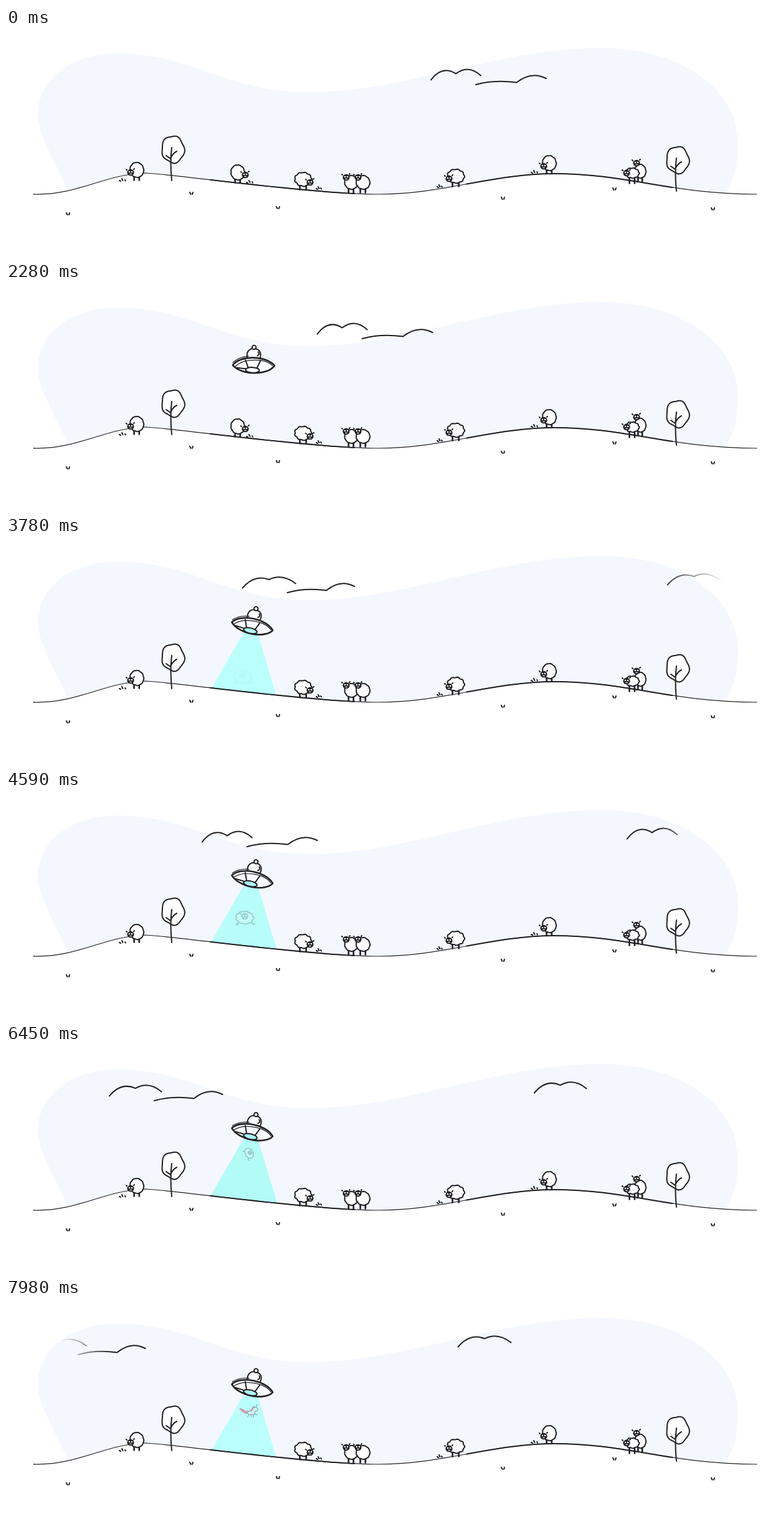
These frames come from a looping animation (1239 px wide and 363 px high, 8000 ms). An HTML page:

```html
<!DOCTYPE html>
<html lang="en">
<head>
<meta charset="utf-8">
<title>Meadow visit</title>
<style>
html, body { margin: 0; width: 100%; height: 100%; overflow: hidden; background: #fff; }
svg { display: block; width: 1239px; height: 363px; }
.ink { fill: none; stroke: #1f1f22; stroke-width: 2; stroke-linecap: round; stroke-linejoin: round; }
.thin { stroke-width: 1.2; }
.bold { stroke-width: 2.6; }
.white { fill: #fff; }
.dark { fill: #1f1f22; }
</style>
</head>
<body>
<svg viewBox="0 0 1239 363">
  <defs>
    <linearGradient id="edge" gradientUnits="userSpaceOnUse" x1="0" x2="1239" y1="0" y2="0">
      <stop offset=".071" stop-color="#000"/>
      <stop offset=".137" stop-color="#fff"/>
      <stop offset=".843" stop-color="#fff"/>
      <stop offset=".931" stop-color="#000"/>
    </linearGradient>
    <mask id="fade" maskUnits="userSpaceOnUse" x="0" y="0" width="1239" height="363">
      <rect width="1239" height="363" fill="url(#edge)"/>
    </mask>
  </defs>
  <path fill="#f4f7fe" d="M97 255C85 226 51 172 51 140C51 85 100 41 180 41C300 41 350 103 490 103C640 103 790 32 955 32C1085 32 1175 100 1175 185C1175 220 1168 245 1154 264V270H97Z"/>
  <g id="birds" mask="url(#fade)"></g>
  <path id="beam"/>
  <g id="land"></g>
  <g id="rising"></g>
  <g id="pony" class="ink" style="stroke:#7c9c9e;stroke-width:1.1">
    <path d="M-1 -1C-5 4 -7 -6 -14 -4C-11 -2 -10 2 -6 2C-3 5 0 3 2 0" style="stroke:#c98295;fill:#d993a5"/>
    <path d="M0 0C4 -2 6 -1 8 -5C10 -9 15 -6 15 -2L11 0C12 6 5 6 1 5C-2 4 -2 1 0 0Z" fill="#d9f3f1"/>
    <path d="M1 5L-1 9M4 5L5 10M8 5L8 10M10 4L14 6M12 -6L14 -11"/>
    <path d="M9 -7C5 -6 8 -3 4 -1" style="stroke:#c98295;stroke-width:2.4"/>
  </g>
  <g id="ship" class="ink">
    <path d="M-10 -10C-13 -20 -8 -26 0 -26C9 -26 13 -20 10 -10Z" fill="#fbfcff"/>
    <circle cy="-28" r="3.200" fill="#fbfcff"/>
    <path d="M7 -21Q10 -17 6 -15"/>
    <path class="bold" d="M-33 2C-22 -15 20 -16 34 0C24 16 -18 18 -33 2Z" fill="#fbfcff"/>
    <path class="thin" d="M-33 -2Q-23 -12 -8 -13.500"/>
    <path class="thin" d="M-29 4C-16 -10 18 -12 31 0"/>
    <path d="M-13 -7L-8 5M11 -7L6 5M-26 6L-11 7"/>
    <ellipse id="hatch" cx="-1" cy="8.500" rx="11" ry="4.300"/>
  </g>
</svg>
<script>
const NS = 'http://www.w3.org/2000/svg';
const $ = id => document.getElementById(id);
const LOOP = 8000, STEP = 30, TAU = Math.PI * 2;

function add(parent, tag, attrs) {
  const el = document.createElementNS(NS, tag);
  for (const k in attrs) el.setAttribute(k, attrs[k]);
  return parent.appendChild(el);
}
const ink = (parent, d, kind = '') => add(parent, 'path', { class: 'ink ' + kind, d });
const mix = (a, b, u) => a + (b - a) * u;
function ease(t, from, to) {
  const u = Math.max(0, Math.min(1, (t - from) / (to - from)));
  return u * u * (3 - 2 * u);
}

// Rounded outline with a number of lobes
function puff(parent, x, y, rx, ry, lobes, bump) {
  let d = '';
  for (let i = 0; i < 72; i++) {
    const a = i / 72 * TAU, r = 1 + bump * Math.sin(a * lobes + 1) + 0.02 * Math.sin(a * 2);
    d += `${i ? 'L' : 'M'}${x + rx * r * Math.cos(a)} ${y + ry * r * Math.sin(a)}`;
  }
  ink(parent, d + 'Z', 'white');
}

function head(parent, x, y) {
  add(parent, 'ellipse', { class: 'dark', cx: x, cy: y, rx: 5.6, ry: 5.2 });
  for (const s of [-1, 1]) add(parent, 'circle', { class: 'white', cx: x + s * 2, cy: y - 1, r: 1.3 });
  add(parent, 'ellipse', { class: 'white', cx: x, cy: y + 2.5, rx: 2, ry: 0.8 });
  ink(parent, `M${x - 6} ${y - 4}l-1 -1M${x + 5} ${y - 5}l1 -1`);
}

// Head is placed relative to the body; wide sheep are woolly
function sheep(parent, x, y, dx, dy, rx = 11, ry = 12) {
  for (const s of [-0.4, 0.35]) ink(parent, `M${x + s * rx} ${y + ry - 2}V${y + 16.5}`, 'bold');
  puff(parent, x, y, rx, ry, 9, rx > 11 ? 0.05 : 0.02);
  head(parent, x + dx, y + dy);
}

const grass = (parent, x, y, w = 5) =>
  ink(parent, `M${x - w} ${y}l2 1M${x - 1} ${y - 3}l1.500 3M${x + w - 1} ${y - 1}l1 1.500`);

function tree(parent, x, y) {
  puff(parent, x, y, 18, 21.5, 5, 0.05);
  ink(parent, `M${x - 2} ${y - 3}q-3 23 0 53m-2 -36q4 -8 10 -11m-17 7l7 5`);
}

const land = $('land');
const hill = 'M45 267C115 269 160 234 225 233C290 237 490 267 600 267' +
  'C700 267 780 234 880 234C1000 234 1060 266 1205 267';
add(land, 'path', { class: 'white', d: hill + 'V363H45Z' });
ink(land, hill, 'thin');
const heavy = ink(land, hill);
heavy.setAttribute('pathLength', 1160);
heavy.setAttribute('stroke-dasharray', '0 285 230 180 330 999');

tree(land, 268, 195);
tree(land, 1078, 212);

const grazer = add(land, 'g', {});
sheep(land, 210, 228, -10, 4);
sheep(grazer, 372, 232, 12, 4);
sheep(land, 477, 243, 11, 5, 13.5, 11);
sheep(land, 554, 248, -8, -8, 10.5, 11);
sheep(land, 573, 248, -8, -8, 11, 11);
sheep(land, 722, 238, -11, 4, 13.5, 11);
sheep(land, 872, 217, -9, 5);
sheep(land, 1018, 230, -6, -13, 9, 11);
sheep(land, 1005, 233, -9, 0, 11.1, 8);
grass(land, 187, 245);
grass(grazer, 391, 248);
grass(land, 502, 258, 4);
grass(land, 696, 255, 4);
grass(land, 848, 232);

for (const [x, y] of [[100, 298], [298, 265], [437, 288], [798, 273], [977, 258], [1135, 290]])
  ink(land, `M${x - 3} ${y - 1}l1.500 3M${x + 2} ${y - 1}l-1 3`);

const rising = $('rising');
ink(rising, 'M-9 7L-14 11M-14 11L-11 11M9 7L14 11L16 9');
puff(rising, 0, 0, 14, 10, 9, 0.05);
head(rising, 0, -2);

// Wing heights run from tip to tip; sway is how much the span changes per flap
const gull = { span: 83, sway: 3, notch: 0.5, ys: [83.5, 69, 71.5, 66.5, 76.5], dip: -2 };
const glider = { span: 110, sway: -3, notch: 0.58, ys: [91, 86, 87.5, 76.5, 81], dip: 0 };
const birds = [
  { ...gull, x: 682, lift: 0 },
  { ...glider, x: 754, lift: 0 },
  { ...gull, x: 1364, lift: 5 }
];
for (const b of birds) b.el = ink($('birds'), '');

function drawBird(b, t) {
  const flap = Math.cos((t - 1110) / 2400 * TAU);
  const x = b.x - 0.08 * t, w = b.span + b.sway * flap, n = w * b.notch;
  const [tip, crest, mid, crest2, end] = b.ys.map(y => y - b.lift);
  const ny = mid + b.dip * flap;
  b.el.setAttribute('d', `M${x} ${tip}Q${x + n * 0.45} ${2 * crest - (tip + ny) / 2} ${x + n} ${ny}` +
    `Q${x + (n + w) / 2} ${2 * crest2 - (ny + end) / 2} ${x + w} ${end}`);
}

function place(el, x, y, scale, turn, alpha) {
  el.setAttribute('transform', `translate(${x} ${y}) rotate(${turn}) scale(${scale})`);
  el.setAttribute('opacity', alpha);
}

function draw(t) {
  birds.forEach(b => drawBird(b, t));

  // Ship glides in, sways, then settles tilted over the grazer
  const settle = ease(t, 2450, 3000);
  const sway = Math.cos((t - 1350) / 1860 * TAU), hover = Math.cos((t - 3780) / 1050 * TAU);
  const x = -40 + 437 / (1 + Math.exp((853 - t) / 152)) - 2 * settle;
  const y = mix(138.5 + 5.5 * sway, 142.3 + 1.7 * hover, settle);
  const tilt = mix(-2.5 * sway, 13, settle);
  place($('ship'), x, y, 1, tilt, 1);

  const on = ease(t, 2650, 3050), r = tilt * TAU / 360;
  const hx = x - Math.cos(r) - 8.5 * Math.sin(r), hy = y + 8.5 * Math.cos(r);
  const beam = $('beam'), glow = (1 + hover) / 2;
  beam.setAttribute('d', `M${hx - 9} ${hy}H${hx + 11}L${435 - hover} 258L${321 + hover} 258Z`);
  beam.setAttribute('fill', `rgb(${mix(179, 186, glow)} ${mix(251, 255, glow)} ${mix(247, 252, glow)})`);
  beam.setAttribute('opacity', on);
  $('hatch').setAttribute('fill', on > 0.5 ? '#aefaf6' : '#fbfcff');
  grazer.setAttribute('opacity', 1 - on);

  // Sheep floats up and shrinks away; the pony comes back down
  const u = Math.max(0, Math.min(1, (t - 3500) / 3400)), spin = ease(u, 0.6, 0.95);
  place(rising, 379 + 13 * u, 234 - 60 * Math.sin(u * TAU / 4), 1 - 0.45 * spin, 70 * spin,
    0.28 * ease(u, 0, 0.5) * (1 - ease(u, 0.88, 1)));
  const v = ease(t, 7050, 7900);
  place($('pony'), mix(392, 389, v), mix(160, 182, v), mix(0.2, 1, v), -40 * (1 - v), 0.85 * v);
}

const start = performance.now();
function tick() {
  const t = (performance.now() - start) % LOOP;
  draw(Math.floor(t / STEP) * STEP);
  requestAnimationFrame(tick);
}
tick();
</script>
</body>
</html>
```
